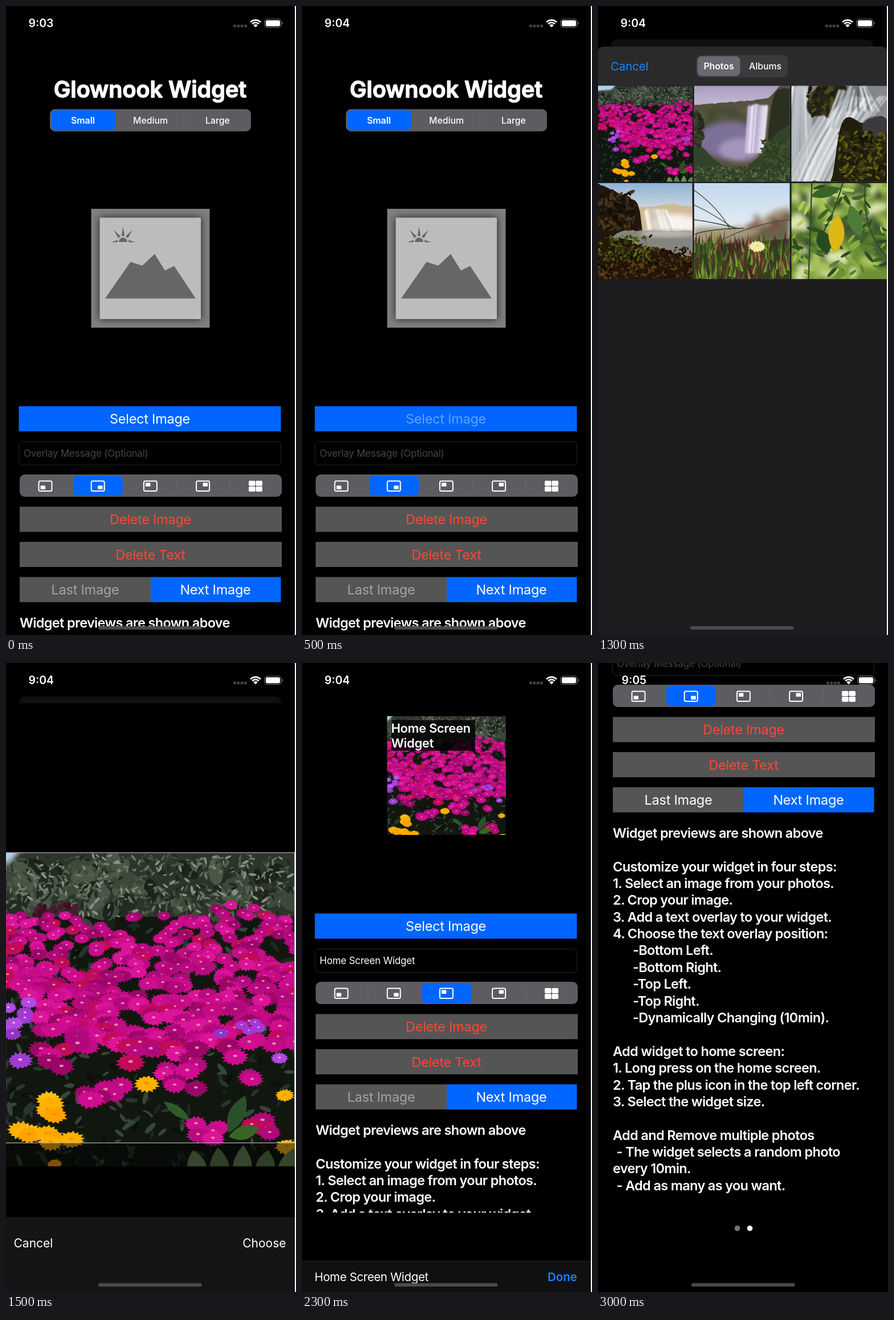
An HTML page that plays this animation: 509x1101 px, repeating every 3500 ms.

```html
<!DOCTYPE html>
<html lang="en">
<head>
<meta charset="utf-8">
<title>Photo widget setup</title>
<style>
  html, body { margin: 0; width: 100%; height: 100%; overflow: hidden; background: #000; }
  #stage { display: block; width: 509px; height: 1101px; }
  text { font-family: Inter, "Open Sans", sans-serif; font-optical-sizing: none; white-space: pre; }
  .card { filter: drop-shadow(0 0 7px rgba(0, 0, 0, .75)); }
</style>
</head>
<body>
<svg id="stage" viewBox="0 0 509 1101" xmlns="http://www.w3.org/2000/svg"></svg>
<script>
const BLUE = '#0066ff', GRAY = '#555', RED = '#ff453a', SEG = '#5d5d61';
const STEP = 500;
const steps = [
  { view: home, time: '9:03' },
  { view: home, time: '9:04', press: 'select' },
  { view: picker, time: '9:04' },
  { view: crop, time: '9:04' },
  { view: home, time: '9:04', dy: -262, photo: true, place: 2, typing: true },
  { view: home, time: '9:05', dy: -251, photo: true, place: 2, press: 'next' },
  { view: home, time: '9:05', dy: -782, dx: 2, last: true }
];

// Drawing helpers
let seed = 7;
const rnd = (a = 0, b = 1) => {
  seed = (seed * 1664525 + 1013904223) % 4294967296;
  return a + (b - a) * seed / 4294967296;
};
const pick = list => list[Math.floor(rnd(0, list.length))];
const fix = n => n.toFixed(1);
const rise = (x, mid, width) => 1 / (1 + Math.exp((mid - x) / width));
const bump = (x, mid, width) => Math.exp(-(((x - mid) / width) ** 2));
const repeat = (n, fn) => Array.from({ length: n }, (_, i) => fn(i)).join('');
const rect = (x, y, w, h, fill, rx = 0, more = '') =>
  `<rect x="${x}" y="${y}" width="${w}" height="${h}" rx="${rx}" fill="${fill}" ${more}/>`;
const poly = (points, fill) => `<polygon points="${points}" fill="${fill}"/>`;
const path = (d, fill, more = '') => `<path d="${d}" fill="${fill}" ${more}/>`;
const circle = (x, y, r, fill) => `<circle cx="${x}" cy="${y}" r="${r}" fill="${fill}"/>`;
const oval = (x, y, rx, ry, fill, turn = 0) =>
  `<ellipse rx="${fix(rx)}" ry="${fix(ry)}" fill="${fill}" transform="translate(${fix(x)} ${fix(y)}) rotate(${fix(turn)})"/>`;
const text = (x, y, str, size, { fill = '#fff', weight = 400, anchor = 'start', ls = 0, more = '' } = {}) =>
  `<text x="${x}" y="${y}" font-size="${size}" font-weight="${weight}" fill="${fill}" text-anchor="${anchor}" letter-spacing="${ls}" ${more}>${str}</text>`;
const label = (x, y, str, fill = '#fff', opacity = 1) =>
  text(x, y, str, 23.5, { fill, anchor: 'middle', ls: -.25, more: `opacity="${opacity}"` });
const frame = (x, y, w, h, box, body) =>
  `<svg x="${x}" y="${y}" width="${w}" height="${h}" viewBox="${box}" overflow="hidden">${body}</svg>`;
const gradient = (id, ...stops) =>
  `<linearGradient id="${id}" x1="0" y1="0" x2="0" y2="1">${stops.map((c, i) =>
    `<stop offset="${i / (stops.length - 1)}" stop-color="${c}"/>`).join('')}</linearGradient>`;
const soft = (body, blur = 'soft') => `<g filter="url(#${blur})">${body}</g>`;

// Photo helpers
const specks = (n, x0, y0, x1, y1, colors, rx, ry, tilt = 180) => repeat(n, () => {
  const k = rnd(.6, 1.3);
  return oval(rnd(x0, x1), rnd(y0, y1), rx * k, ry * k, pick(colors), rnd(-tilt, tilt));
});
const land = (height, fill) => {
  const ridge = repeat(43, i => `${i * 4},${fix(height(i * 4) + rnd(-1, 1))} `);
  return poly(`${ridge}168,168 0,168`, fill);
};
const leaf = (x, y, len, width, turn, fill) =>
  path(`M0 ${-len}Q${width * 2} 0 0 ${len}Q${-width * 2} 0 0 ${-len}Z`, fill, `transform="translate(${x} ${y}) rotate(${turn})"`);
// Water threads running from one span to another
const streaks = (n, [x0, x1, y0], [u0, u1, v], colors, bend = 0) => repeat(n, i => {
  const k = (i + rnd()) / n, a = x0 + (x1 - x0) * k, b = u0 + (u1 - u0) * k;
  return path(`M${fix(a)} ${fix(y0 + rnd(-3, 3))}Q${fix((a + b) / 2 - bend)} ${fix((y0 + v) / 2 - bend)} ${fix(b)} ${v}`,
    'none', `stroke="${pick(colors)}" stroke-width="${fix(rnd(2, 5))}" opacity=".75"`);
});

function bloom(x, y, r, fill, heart) {
  const n = 15, turn = rnd(0, .4);
  const points = repeat(n * 2, i => {
    const a = i * Math.PI / n + turn, q = r * (i % 2 ? .76 : rnd(.9, 1.08));
    return `${fix(x + q * Math.cos(a))},${fix(y + q * .66 * Math.sin(a))} `;
  });
  return poly(points, fill) + (heart ? oval(x, y - r * .08, r * .15, r * .09, heart) : '');
}

function flowers() {
  const pinks = ['#c40a86', '#d00c90', '#b0087a', '#db1499', '#9c0668', '#c00c58', '#cb0d8c', '#b80a80'];
  const golds = ['#ffb000', '#ffa200', '#ffbe1a'], violets = ['#a23ad2', '#b24ae0', '#9434c4'];
  const pink = (x, y, r) => bloom(x, y, r, pick(pinks), r > 13 ? '#e889a4' : '');
  const cluster = (n, x, y, w, h, r, colors, heart) => repeat(n, i =>
    bloom(x + rnd(-w, w), y - h + 2 * h * (i + .5) / n, r * rnd(.8, 1.1), pick(colors), heart));
  const pinkCluster = (n, x, y, w, h) => cluster(n, x, y, w, h, 24, pinks, '#e889a4');

  let out = rect(-80, 0, 600, 549, '#11170f') + rect(-80, 0, 600, 112, '#2c352b');
  out += specks(90, -80, 20, 510, 110, ['#3d483a', '#232b22', '#4a5646', '#1b221a'], 22, 12);
  out += specks(800, -80, 5, 510, 112, ['#55624f', '#6b7868', '#879284', '#38442f', '#20281e', '#475540'], 5.5, 1.9);
  out += soft(poly('-90,-10 30,-10 12,12 -5,24 -90,30', '#b4cfea'));
  out += specks(500, -80, 115, 510, 549, ['#1c281b', '#27362a', '#10170f', '#354638', '#0b100a'], 10, 3.5);
  out += specks(18, 48, 92, 122, 110, ['#3a1222', '#4b1a2c'], 8, 5);
  const total = 560;
  out += repeat(total, i => {
    const x = rnd(-85, 515), k = i / total;
    const top = 110 - 26 * bump(x, 385, 65), y = top + (345 - top) * k;
    const gap = Math.sin(x / 47 + y / 23) + Math.sin(x / 29 - y / 31);
    return gap < -1.35 || (x < 60 && y > 255) ? '' : pink(x, y, 13 + 11 * k);
  });
  out += pinkCluster(7, 95, 345, 50, 35) + pinkCluster(18, 325, 370, 115, 45) + pinkCluster(7, 180, 420, 65, 14);
  out += pinkCluster(5, 345, 488, 30, 16) + pinkCluster(4, 450, 480, 28, 14);
  out += cluster(7, 22, 290, 30, 32, 17, violets, '#e4b8ef') + cluster(5, 412, 307, 36, 12, 15, violets, '#e4b8ef');
  out += bloom(25, 364, 23, violets[0], '#e4b8ef') + bloom(480, 360, 16, violets[1], '#e4b8ef');
  out += leaf(300, 452, 28, 8, -55, '#2f5a29') + leaf(405, 458, 36, 14, 25, '#28512a') + leaf(418, 490, 28, 12, 75, '#386524');
  out += bloom(247, 405, 23, golds[0], '#f08c00') + cluster(4, 78, 446, 12, 18, 25, golds, '#f08c00');
  out += cluster(3, 34, 490, 14, 6, 24, golds, '#f08c00') + cluster(4, 90, 500, 26, 10, 23, golds, '#f08c00');
  out += cluster(2, 492, 470, 4, 90, 20, golds, '#f08c00') + cluster(2, 86, 546, 6, 3, 15, golds);
  out += repeat(5, i => leaf(335 + i * 40, 552, 32 + (i % 3) * 4, 17, -12 + i * 7, i % 2 ? '#5f7f4a' : '#6d8c56'));
  return out;
}

const photos = [
  // lilac falls
  () => rect(0, 0, 168, 168, 'url(#lilac)') +
    land(x => 34 - x * .08 - 26 * rise(x, 142, 6), '#55513f') +
    soft(specks(60, 0, 40, 95, 80, ['#414a30', '#5d5840', '#4b4d3a'], 12, 5, 20) +
      oval(64, 96, 58, 32, '#7d7096') + oval(80, 112, 36, 20, '#a295bb')) +
    soft(streaks(26, [95, 130, 34], [90, 122, 118], ['#d5cbe4', '#ece6f4', '#b9acd0']), 'haze1') +
    land(x => 168 - 163 * rise(x, 130, 4), '#2b2f20') +
    land(x => 145 - 45 * bump(x, 0, 35) - 80 * rise(x, 128, 14), '#33432a') +
    specks(35, 0, 48, 16, 100, ['#2d3022', '#3a4028', '#22261a'], 7, 4) +
    specks(240, 0, 142, 168, 168, ['#4c6037', '#283622', '#5f7245', '#3c5430'], 3, 1.2) +
    specks(90, 118, 95, 168, 140, ['#40522c', '#2a3a20'], 5, 1.6) + specks(8, 68, 125, 110, 160, ['#a44c42'], 1.5, 1.5),
  // rapids
  () => rect(0, 0, 168, 168, '#85888b') +
    soft(streaks(18, [0, 30, 0], [-25, 45, 168], ['#eef2f5', '#c6cbd0', '#a5abb1']) +
      streaks(34, [70, 170, 20], [-10, 78, 168], ['#f6f8f9', '#d5d9dc', '#8f9498', '#b7bcc0'], 8) +
      streaks(12, [95, 135, 0], [60, 165, 45], ['#eff1f3', '#6d7073', '#3a3b3c']), 'haze1') +
    soft(oval(62, 20, 42, 24, '#242116', -42), 'haze1') +
    specks(50, 30, 2, 75, 52, ['#4f4a18', '#39361a', '#1b1a12', '#2a271c'], 6, 3) +
    soft(streaks(8, [82, 112, 8], [55, 95, 75], ['#e6e9eb', '#aeb3b7']), 'haze1') +
    land(x => 172 - 112 * rise(x, 78, 4) + 6 * Math.sin(x / 9), '#211e0f') +
    soft(oval(150, 72, 26, 18, '#3b3b3d'), 'haze1') +
    specks(230, 84, 80, 166, 166, ['#66600f', '#4c480d', '#2c290f', '#17160c', '#383411'], 5, 2),
  // dusk bay
  () => rect(0, 0, 168, 168, 'url(#dusk)') + land(x => 42 - 5 * bump(x, 130, 28), '#cfb898') +
    soft(oval(138, 72, 42, 18, '#f7f2ea')) +
    soft(streaks(16, [84, 122, 46], [90, 138, 84], ['#f2efe9', '#d2cbc2', '#fffdf8']), 'haze1') +
    land(x => x * .45 + 220 * rise(x, 84, 3), '#21170d') +
    specks(110, 0, 15, 66, 82, ['#3b2913', '#1a130c', '#4c3418', '#140e08'], 6, 2.6) +
    land(x => 83 + 12 * rise(-x, -35, 4), '#85857f') + soft(oval(125, 88, 50, 6, '#c2bfb8')) +
    land(x => 88 + x * .26 + 3 * Math.sin(x / 11), '#241708') +
    specks(330, 0, 112, 168, 168, ['#4d3311', '#5e3f18', '#1c140b', '#35260e', '#100b06'], 3.5, 1.7) +
    specks(130, 0, 92, 95, 135, ['#65701a', '#4a5616', '#353c12', '#1d1a0a'], 3.5, 1.6),
  // dunes
  () => rect(0, 0, 168, 168, 'url(#haze)') +
    soft(land(x => 78 - 38 * rise(x, 125, 14), '#a5967f') + land(x => 104 - 44 * rise(x, 118, 18), '#6b634c') +
      specks(12, 100, 55, 168, 85, ['#7d4a3a', '#5a5a3e'], 10, 4, 20)) +
    land(x => 106 - 8 * bump(x, 168, 60), '#333f1d') +
    repeat(220, i => {
      const x = rnd(0, 168), y = 108 + i * .3, h = rnd(16, 34), lean = rnd(-7, 7);
      return poly(`${fix(x - 2.6)},${fix(y)} ${fix(x + lean)},${fix(y - h)} ${fix(x + 2.6)},${fix(y)}`,
        pick(['#44611f', '#587827', '#2b4118', '#702e34', '#7f9336', '#521f28']));
    }) +
    repeat(4, i => path(`M0 ${12 + i * 26}Q${44 - i * 6} ${44 + i * 12} ${64 + i * 8} ${82 - i}`, 'none', 'stroke="#3b442d" stroke-width="1.3"')) +
    path('M0 132Q70 75 168 64', 'none', 'stroke="#4a4f38" stroke-width="1.3"') +
    bloom(111, 111, 16, '#f0eea5', '#e8d84e'),
  // leaves
  () => rect(0, 0, 168, 168, '#6f8f36') +
    soft(specks(120, 0, 0, 168, 168, ['#a9c35c', '#4d6b2b', '#dbe6ae', '#38502a', '#87aa3a', '#465a3a'], 15, 8)) +
    specks(90, 0, 0, 168, 168, ['#55822a', '#86ad3c', '#3d6426', '#b3cf62', '#2f4d22'], 11, 3, 70) +
    path('M36 0L30 168M90 0Q70 70 46 100M130 0Q122 80 168 130', 'none', 'stroke="#334d21" stroke-width="2.4"') +
    leaf(57, 102, 22, 13, -20, '#294a20') + leaf(112, 66, 30, 12, -18, '#4d7c38') + leaf(60, 16, 28, 9, 75, '#3a6426') +
    leaf(79, 89, 34, 14, 4, '#dcb716')
];

const blurFilter = (id, size) =>
  `<filter id="${id}" x="-20%" y="-20%" width="140%" height="140%"><feGaussianBlur stdDeviation="${size}"/></filter>`;
const defs = () => `<defs>${blurFilter('soft', 4)}${blurFilter('haze1', 1.2)}
  ${gradient('lilac', '#a79cc0', '#d6cee0', '#8a7fa0', '#756c88')}
  ${gradient('dusk', '#8fb3d4', '#dbe0df', '#f2e8d8', '#8a8478')}
  ${gradient('haze', '#c3d8ef', '#e6edf4', '#e9e9e6')}
  <g id="flowers">${flowers()}</g></defs>`;
const garden = '<use href="#flowers"/>';

// Interface parts
function statusBar(time) {
  const arc = (r, w) => path(`M${438 - r * .72} ${37 - r * .7}A${r} ${r} 0 0 1 ${438 + r * .72} ${37 - r * .7}`, 'none', `stroke="#fff" stroke-width="${w}"`);
  return text(39.5, 37, time, 19.5, { weight: 600 }) +
    repeat(4, i => rect(399 + i * 6.3, 32.5, 5, 5, '#424244', 1.8)) +
    arc(12.4, 2.8) + arc(8.1, 2.6) + path('M438 37.5L434.2 33.4A5.6 5.6 0 0 1 441.8 33.4Z', '#fff') +
    rect(454, 23, 29, 14.5, 'none', 4.5, 'stroke="#77777a" stroke-width="1.2"') +
    rect(456, 25, 25, 10.5, '#fff', 2.8) + path('M484.8 27.8Q487.5 30.2 484.8 32.8Z', '#88888b');
}
const homeBar = () => rect(162, 1085.5, 181.5, 6, '#4b4b4d', 3);

function sizeTabs() {
  const tab = (x, str, weight) => text(x, 205.7, str, 15.8, { weight, anchor: 'middle' });
  return rect(77, 180.5, 353, 39, SEG, 9) + rect(79.5, 182.5, 112.5, 35, BLUE, 7.5) +
    rect(312, 190, 1, 20, '#6d6d71') + tab(135, 'Small', 600) + tab(253.5, 'Medium', 500) + tab(371.5, 'Large', 500);
}

function placeTabs(sel) {
  const corner = (x, i) => rect(x - 11.5, 831.5, 23, 17.5, 'none', 2.5, 'stroke="#fff" stroke-width="2"') +
    rect(i % 2 ? x : x - 8.5, i < 2 ? 839.5 : 834.5, 8.5, 6.5, '#fff', .8);
  const grid = x => repeat(4, i => rect(x - 12 + (i % 2) * 12.5, 831 + (i >> 1) * 10, 11.5, 9, '#fff', 1.8));
  return rect(24, 820, 460, 39, SEG, 9) +
    repeat(4, i => i + 1 === sel || i === sel ? '' : rect(115.5 + i * 92.2, 829.5, 1, 20, '#6d6d71')) +
    rect(118 + (sel - 1) * 92.6, 822, 87, 35.5, BLUE, 7.5) +
    repeat(5, i => i < 4 ? corner(69 + i * 92.2, i) : grid(438));
}

function emptyPreview() {
  const ray = a => `<polygon points="-2.6,-10.5 0,-27 2.6,-10.5" fill="#666" transform="translate(205.5 413) rotate(${a})"/>`;
  return rect(149, 355, 209, 209, '#7f7f7f') + rect(164.5, 370.5, 177.5, 177.5, '#bcbcbc', 1.5, 'class="card"') +
    [-38, 0, 38].map(ray).join('') +
    poly('185,413.5 196.5,409.5 195.5,413.5', '#666') + poly('227,413.5 214.5,409.5 215.5,413.5', '#666') +
    path('M198 413A7.5 7.5 0 0 1 213 413Z', '#666') +
    poly('174,512 218.5,448 239,454.5 261,434 279,463 295,455 333,512', '#666');
}

function preview(photo) {
  if (!photo) return frame(149.5, 355, 208, 208, '149.5 355 208 208', emptyPreview());
  const opt = { weight: 600, ls: -.35 };
  return frame(149.5, 355, 208, 208, '0 0 507 507', garden) + rect(157, 362, 147, 53.5, '#000', 0, 'opacity=".82"') +
    text(156.5, 384, 'Home Screen', 22, opt) + text(156.5, 410, 'Widget', 22, opt);
}

const guide = [
  'Widget previews are shown above', '',
  'Customize your widget in four steps:', '1. Select an image from your photos.', '2. Crop your image.',
  '3. Add a text overlay to your widget.', '4. Choose the text overlay position:',
  '>-Bottom Left.', '>-Bottom Right.', '>-Top Left.', '>-Top Right.', '>-Dynamically Changing (10min).', '',
  'Add widget to home screen:', '1. Long press on the home screen.',
  '2. Tap the plus icon in the top left corner.', '3. Select the widget size.', '',
  'Add and Remove multiple photos', '~- The widget selects a random photo', 'every 10min.', '~- Add as many as you want.'
];
const indent = { '>': 35, '~': 6.5 };
const guideText = () => guide.map((line, i) =>
  text(24 + (indent[line[0]] || 0), 1087.8 + i * 29.38, line.replace(/^[>~]/, ''), 23.5, { weight: 600, ls: -.66 })).join('');

// Views
function home({ time, dy = 0, dx = 0, photo, place = 1, press, typing, last }) {
  const body = text(253, 160, 'Glownook Widget', 39.5, { weight: 600, anchor: 'middle', more: 'stroke="#fff" stroke-width="1.4" stroke-linejoin="round"' }) +
    sizeTabs() + preview(photo) +
    rect(22.5, 700.5, 460, 44, BLUE) + label(252.5, 731, 'Select Image', '#fff', press === 'select' ? .38 : 1) +
    rect(23, 762.5, 459.5, 41, '#000', 6, 'stroke="#232325"') +
    text(31, 789, photo ? 'Home Screen Widget' : 'Overlay Message (Optional)', 17, { fill: photo ? '#fff' : '#444446', ls: -.2 }) +
    placeTabs(place) +
    rect(24, 876.5, 460, 44, GRAY) + label(253.5, 907, 'Delete Image', RED) +
    rect(24, 938, 460, 44, GRAY) + label(253.5, 968.5, 'Delete Text', RED) +
    rect(24, 999.5, 230, 44, GRAY) + label(139, 1030, 'Last Image', last ? '#fff' : '#a3a3a3') +
    rect(254, 999.5, 228.5, 44, BLUE) + label(367.5, 1030, 'Next Image', '#fff', press === 'next' ? .38 : 1) +
    guideText() + circle(242.5, 1771.5, 4.8, '#767678') + circle(264.5, 1771.5, 4.8, '#fff');
  const height = typing ? 962 : 1101;
  const bar = typing ? rect(0, 1047, 507, 54, '#101011') + rect(0, 1046.5, 507, 1, '#252527') +
    text(22, 1082, 'Home Screen Widget', 20.5, { ls: -.35 }) +
    text(431, 1082, 'Done', 20.5, { weight: 600, fill: '#1a82ff' }) : '';
  return `<g transform="translate(${dx} 0)">` + frame(0, 0, 509, height, `0 ${-dy} 509 ${height}`, body) +
    bar + statusBar(time) + homeBar() + '</g>';
}

const backCard = () => rect(23, 58.5, 459.5, 40, '#10100c', 10);

function picker({ time }) {
  const cells = photos.map((draw, i) => {
    const n = i + 1;
    return frame(n % 3 * 171 - 2.5, n < 3 ? 139.5 : 310, 168.5, 168, '0 0 168.5 168', draw());
  }).join('');
  return backCard() + path('M0 1101V81Q0 71 10 71H497Q507 71 507 81V1101Z', '#1c1c1e') +
    path('M0 139V81Q0 71 10 71H497Q507 71 507 81V139Z', '#2a2a2b') +
    text(22, 112.5, 'Cancel', 20.5, { fill: '#1485ff', ls: -.15 }) +
    rect(172, 86, 161, 39, '#3b3b3e', 9) + rect(174.5, 88, 75, 34.5, '#6a6870', 7.5) +
    text(212, 111, 'Photos', 15.8, { weight: 600, anchor: 'middle' }) +
    text(293.5, 111, 'Albums', 15.8, { weight: 500, anchor: 'middle' }) +
    frame(0, 139.5, 166, 168, '-76.8 0 542.5 549', garden) + cells + statusBar(time) + homeBar();
}

function crop({ time }) {
  return backCard() + rect(0, 70.5, 507, 1031, '#000') + frame(0, 332, 507, 549, '0 0 507 549', garden) +
    rect(0, 840, 507, 41, '#000', 0, 'opacity=".5"') +
    rect(-.5, 332, 507, 508, 'none', 0, 'stroke="#b4b4b4" stroke-width="1.2"') +
    rect(0, 970, 507, 131, '#151516') +
    text(13.5, 1022.5, 'Cancel', 21) + text(491.5, 1022.5, 'Choose', 21, { anchor: 'end' }) +
    statusBar(time) + homeBar();
}

// A bare strip shows beside every screen that is not shifted right
const edge = s => s.dx ? '' : rect(507, 0, 2, 1101, '#fff');
const stage = document.getElementById('stage');
stage.innerHTML = defs() + steps.map((s, i) =>
  `<g class="scene" display="${i ? 'none' : 'inline'}">${s.view(s)}${edge(s)}</g>`).join('');
const scenes = [...stage.querySelectorAll('.scene')];
let shown = 0;

function tick() {
  const now = Math.floor(performance.now() / STEP) % steps.length;
  if (now !== shown) {
    scenes[shown].setAttribute('display', 'none');
    scenes[now].setAttribute('display', 'inline');
    shown = now;
  }
  requestAnimationFrame(tick);
}
tick();
</script>
</body>
</html>
```
